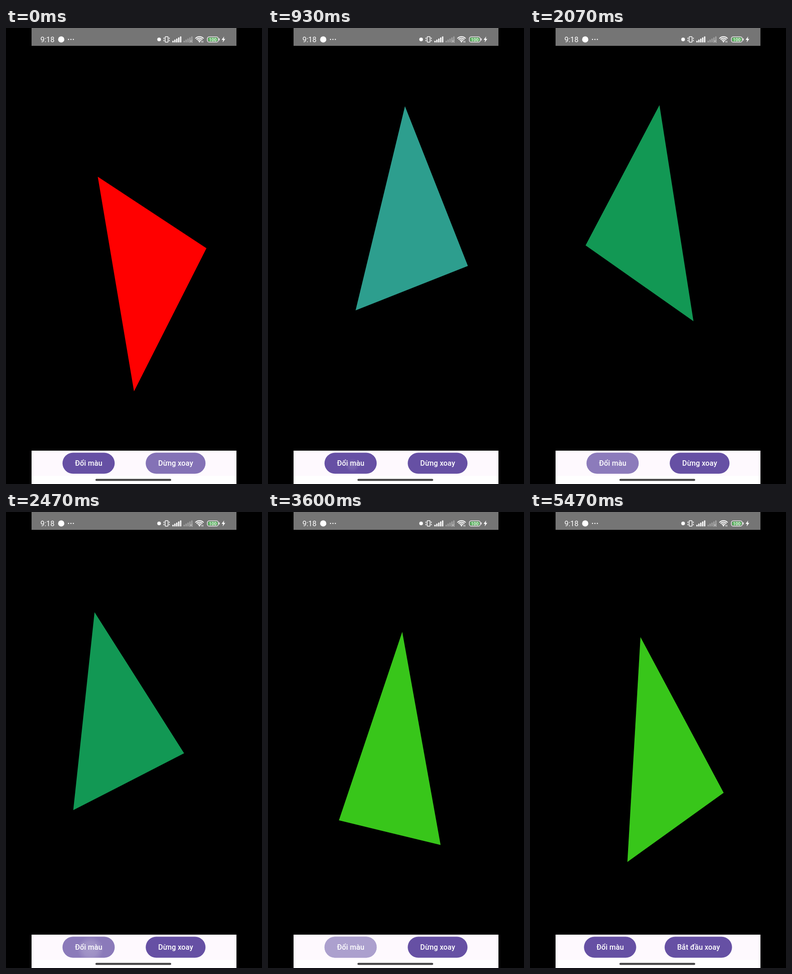
These frames come from a looping animation (561 px wide and 998 px high, 5540 ms). An HTML page:

```html
<!DOCTYPE html>
<html lang="vi">
<head>
<meta charset="utf-8">
<style>
  html, body { margin: 0; width: 100%; height: 100%; overflow: hidden; background: #000; }
  svg { display: block; width: 561px; height: 998px; }
  text { font-family: Roboto, sans-serif; fill: #fff; }
  .label { font-size: 16px; font-weight: 500; letter-spacing: .11px; }
</style>
</head>
<body>
<svg viewBox="0 0 561 998">
  <defs>
    <radialGradient id="glow" gradientUnits="userSpaceOnUse" cx="185" cy="957" r="1">
      <stop offset="0" stop-color="#fff"/>
      <stop offset=".55" stop-color="#fff" stop-opacity=".75"/>
      <stop offset="1" stop-color="#fff" stop-opacity="0"/>
    </radialGradient>
  </defs>
  <rect width="561" height="998"/>
  <polygon id="triangle"/>

  <!-- status bar -->
  <rect x="56" width="449" height="39" fill="#757575"/>
  <text x="75.5" y="31" font-size="16">9:18</text>
  <g fill="#fff">
    <circle cx="121" cy="25" r="6.8"/>
    <circle cx="137" cy="25" r="1.3"/><circle cx="142.3" cy="25" r="1.3"/><circle cx="147.6" cy="25" r="1.3"/>
    <circle cx="335.5" cy="25" r="4"/>
    <path d="M478 18.5l-5.5 7.5h3.4l-1 5.5 5.6-7.7h-3.5z"/>
    <rect x="466.6" y="22.5" width="1.6" height="5" rx=".8"/>
  </g>
  <g fill="none" stroke="#fff" stroke-width="1.5">
    <rect x="348.8" y="19" width="6.4" height="12" rx="1"/>
    <path d="M346 21v8M358 21v8" stroke-dasharray="3 2"/>
    <rect x="441.2" y="19.3" width="24" height="11.6" rx="4" stroke-width="1.3"/>
    <path id="wifi" stroke-width="2"/>
  </g>
  <path id="bars" stroke="#fff" stroke-width="2.8"/>
  <path id="dimBars" stroke="#a2a2a2" stroke-width="2.8"/>
  <path d="M402.5 26l6 6m0-6l-6 6" stroke="#b4b4b4" stroke-width="1.5"/>
  <path d="M424 32l-2.5-3q2.5-2 5 0z" fill="#fff"/>
  <path d="M429 28v4m2.6-4v4" stroke="#fff"/>
  <rect x="443" y="21" width="20.4" height="8.2" rx="2.5" fill="#58b25d"/>
  <text x="453.3" y="28.7" font-size="9.6" font-weight="500" text-anchor="middle">100</text>

  <!-- bottom panel -->
  <rect x="56" y="925" width="449" height="73" fill="#fff"/>
  <rect x="56" y="925" width="449" height="55" fill="#fef9fe"/>
  <rect x="196" y="986.8" width="166" height="4.4" rx="2.2" fill="#464646"/>
  <g id="left">
    <rect class="base" y="929.5" height="46" rx="23" fill="#6650a4"/>
    <rect class="light" y="929.5" height="46" rx="23" fill="#fff"/>
    <rect id="ripple" x="124" y="929.5" width="114" height="46" rx="23" fill="url(#glow)"/>
    <text class="label" y="958">Đổi màu</text>
  </g>
  <g id="right">
    <rect class="base" y="929.5" height="46" rx="23" fill="#6650a4"/>
    <rect class="light" y="929.5" height="46" rx="23" fill="#fff"/>
    <text class="label" y="958"></text>
  </g>
</svg>
<script>
const LOOP = 5540, TICK = 200 / 3, STOP = 59;
const $ = selector => document.querySelector(selector);

// Keys are [tick, value].
const angleKeys = [[0, 45], [14, 127.9], [24, 184], [37, 258], [45, 302.9], [54, 353], [58.8, 380]];
const leftLight = [[14, 0], [18, .24], [24, .255], [37, .24], [45, .31], [54, .46], [62, 0]];
const rightLight = [[0, .196], [7, 0], [57, 0], [60, .3], [68, 0]];
const colors = [[0, '#ff0000'], [13, '#2d9e8e'], [20, '#a4625a'], [30, '#129854'], [41, '#718c72'], [50, '#38c61a']];
const taps = [13, 35];

function interpolate(keys, tick) {
  if (tick <= keys[0][0]) return keys[0][1];
  const next = keys.findIndex(key => key[0] > tick);
  if (next < 0) return keys.at(-1)[1];
  const [t0, v0] = keys[next - 1], [t1, v1] = keys[next];
  return v0 + (v1 - v0) * (tick - t0) / (t1 - t0);
}

function signal(x) {
  return [0, 1, 2, 3, 4].map(i => `M${x + i * 4.2} 31.5v${-3.5 - i * 2.4}`).join('');
}
$('#bars').setAttribute('d', signal(366));
$('#dimBars').setAttribute('d', signal(390.5));
$('#wifi').setAttribute('d', [5, 8.5, 12].map(r =>
  `M${424 - r * .75} ${31 - r * .66}A${r} ${r} 0 0 1 ${424 + r * .75} ${31 - r * .66}`).join(''));

function setButton(id, x, width, light) {
  for (const rect of document.querySelectorAll(`${id} .base, ${id} .light`)) {
    rect.setAttribute('x', x);
    rect.setAttribute('width', width);
  }
  $(id + ' .light').setAttribute('opacity', light);
  $(id + ' text').setAttribute('x', x + 27.4);
}

// Rotation happens in viewport units, so the screen's aspect stretches the shape.
function trianglePoints(degrees) {
  const a = degrees * Math.PI / 180, c = Math.cos(a), s = Math.sin(a);
  return [[0, .5], [-.5, -.5], [.5, -.5]].map(([x, y]) =>
    [280.5 + 224.5 * (x * c - y * s), 482 - 443 * (x * s + y * c)].join()).join(' ');
}

function draw(time) {
  const tick = Math.floor((time % LOOP + 5) / TICK);
  const triangle = $('#triangle');
  triangle.setAttribute('points', trianglePoints(interpolate(angleKeys, tick)));
  triangle.setAttribute('fill', colors.findLast(key => key[0] <= tick)[1]);

  const stopped = tick >= STOP;
  setButton('#left', stopped ? 118.3 : 123.8, 114.4, interpolate(leftLight, tick));
  setButton('#right', stopped ? 295 : 306.2, stopped ? 147.7 : 131, interpolate(rightLight, tick));
  $('#right text').textContent = stopped ? 'Bắt đầu xoay' : 'Dừng xoay';

  const age = tick - (taps.findLast(tap => tap <= tick) ?? -99);
  $('#glow').setAttribute('r', 1 + 14 * age);
  $('#ripple').setAttribute('opacity', age < 9 ? .14 * Math.min(age, 2) * (1 - age / 9) : 0);
}

const start = performance.now();
function animate() {
  draw(performance.now() - start);
  requestAnimationFrame(animate);
}
animate();
</script>
</body>
</html>
```
